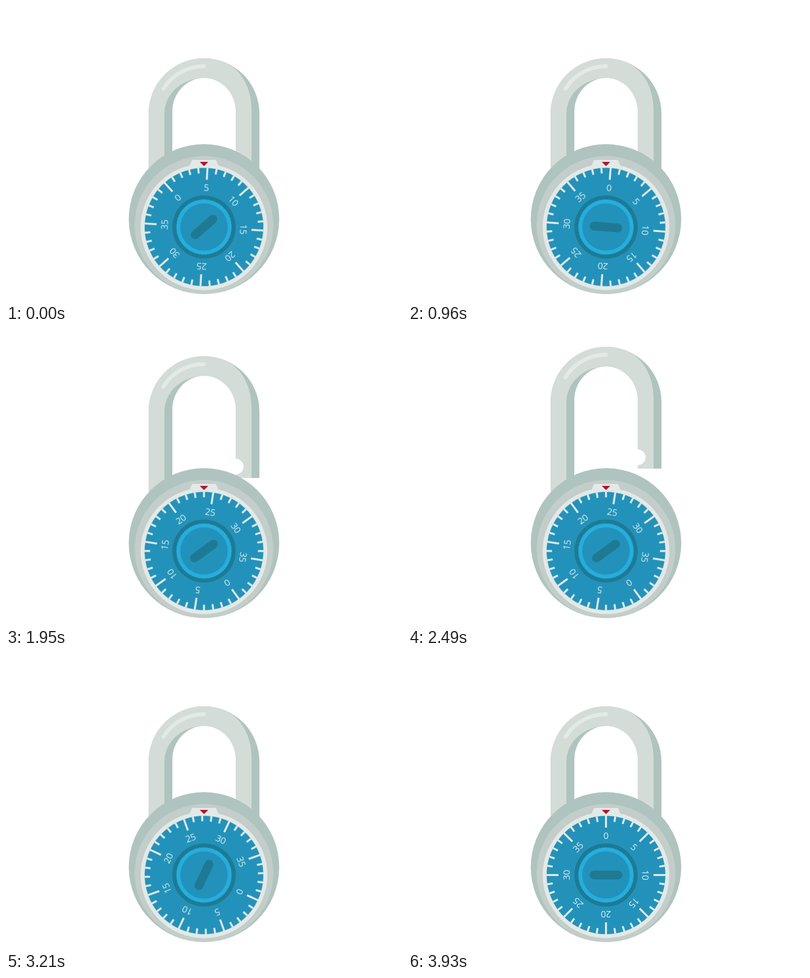
An HTML page that plays this animation: 800x600 px, repeating every 4.23 s.

```html
<!DOCTYPE html>
<html lang="en">
<head>
<meta charset="utf-8">
<title>Combination lock</title>
<style>
  html, body { margin: 0; width: 100%; height: 100%; overflow: hidden; background: #fff; }
  svg { display: block; width: 800px; height: 600px; }

  :root { --steel: #d3dcd6; --shade: #afc4be; --rim: #c3cecb; --pale: #e3e9e6;
          --blue: #2392ba; --bright: #25aedf; --deep: #1e7a94; }

  /* 30 ms steps; the tiny delay keeps steps clear of their boundaries */
  #dial, #shackle { animation: 4230ms linear -2ms infinite; transform-origin: 0 0; }
  #dial { animation-name: turn; }
  #shackle { animation-name: lift; }

  @keyframes turn {
    0%      { transform: rotate(-41.6deg); animation-timing-function: steps(9); }
    6.383%  { transform: rotate(-135deg); }
    9.220%  { transform: rotate(-135deg); animation-timing-function: steps(38); }
    36.170% { transform: rotate(144deg); }
    71.631% { transform: rotate(144deg); animation-timing-function: steps(30); }
    92.908%, 100% { transform: rotate(0deg); }
  }
  @keyframes lift {
    0%      { transform: translateY(0); animation-timing-function: steps(1); }
    36.879% { transform: translateY(-1px); animation-timing-function: steps(19); }
    50.355% { transform: translateY(-77px); animation-timing-function: steps(1); }
    51.064% { transform: translateY(-80px); }
    57.447% { transform: translateY(-80px); animation-timing-function: steps(20); }
    71.631%, 100% { transform: translateY(0); }
  }

  #scale line { stroke: var(--pale); stroke-width: 4; }
  #scale text { font: 500 18.5px "Open Sans", "Noto Sans", sans-serif; font-stretch: 75%;
                letter-spacing: -.3px; text-anchor: middle; fill: #dcf0f2; }
</style>
</head>
<body>
<svg viewBox="0 0 800 600">
  <g id="shackle">
    <path fill="var(--shade)" d="M288 218A112 112 0 0 1 512 218V353H440V218H340V450H288Z"/>
    <path fill="var(--steel)" d="M288 218A112 112 0 0 1 443 114.500C475 129 496 166 496 210V353H440V218H320V450H288Z"/>
    <path fill="var(--shade)" d="M320 450V218A80 72 0 0 1 400 146V450Z"/>
    <path fill="#fff" d="M336 450V214A64 68 0 0 1 464 214V353H440V450Z"/>
    <circle fill="#fff" cx="464" cy="330" r="16"/>
    <path fill="none" stroke="var(--pale)" stroke-width="8" stroke-linecap="round" d="M318 168A96 96 0 0 1 400 122"/>
  </g>

  <circle fill="var(--shade)" cx="400" cy="432" r="152"/>
  <circle fill="var(--rim)" cx="400" cy="444" r="140"/>
  <circle fill="var(--pale)" cx="400" cy="448" r="128"/>
  <path fill="var(--pale)" d="M376 312H424L432 330H368Z"/>
  <path fill="#b5122e" d="M391.500 316H408.500L400 324.500Z"/>

  <g transform="translate(400 448)">
    <g id="dial">
      <circle fill="var(--blue)" r="120"/>
      <g id="scale"></g>
      <circle fill="var(--deep)" r="64"/>
      <circle fill="var(--bright)" r="55.200"/>
      <circle fill="none" stroke="var(--bright)" stroke-width="1.800" r="55.500" pathLength="144" stroke-dasharray="1"/>
      <circle fill="var(--blue)" r="48"/>
      <path stroke="var(--deep)" stroke-width="18" stroke-linecap="round" d="M-24 0H24"/>
    </g>
  </g>
</svg>
<script>
  const scale = document.getElementById('scale');

  function add(tag, attrs, text = '') {
    const el = document.createElementNS('http://www.w3.org/2000/svg', tag);
    for (const key in attrs) el.setAttribute(key, attrs[key]);
    el.textContent = text;
    scale.append(el);
  }

  for (let n = 0; n < 40; n++) {
    const major = n % 5 === 0;
    const transform = `rotate(${n * 9})`;
    add('line', { y1: -120, y2: major ? -96 : -109, transform });
    if (major) add('text', { y: -73.3, transform }, n);
  }
</script>
</body>
</html>
```
